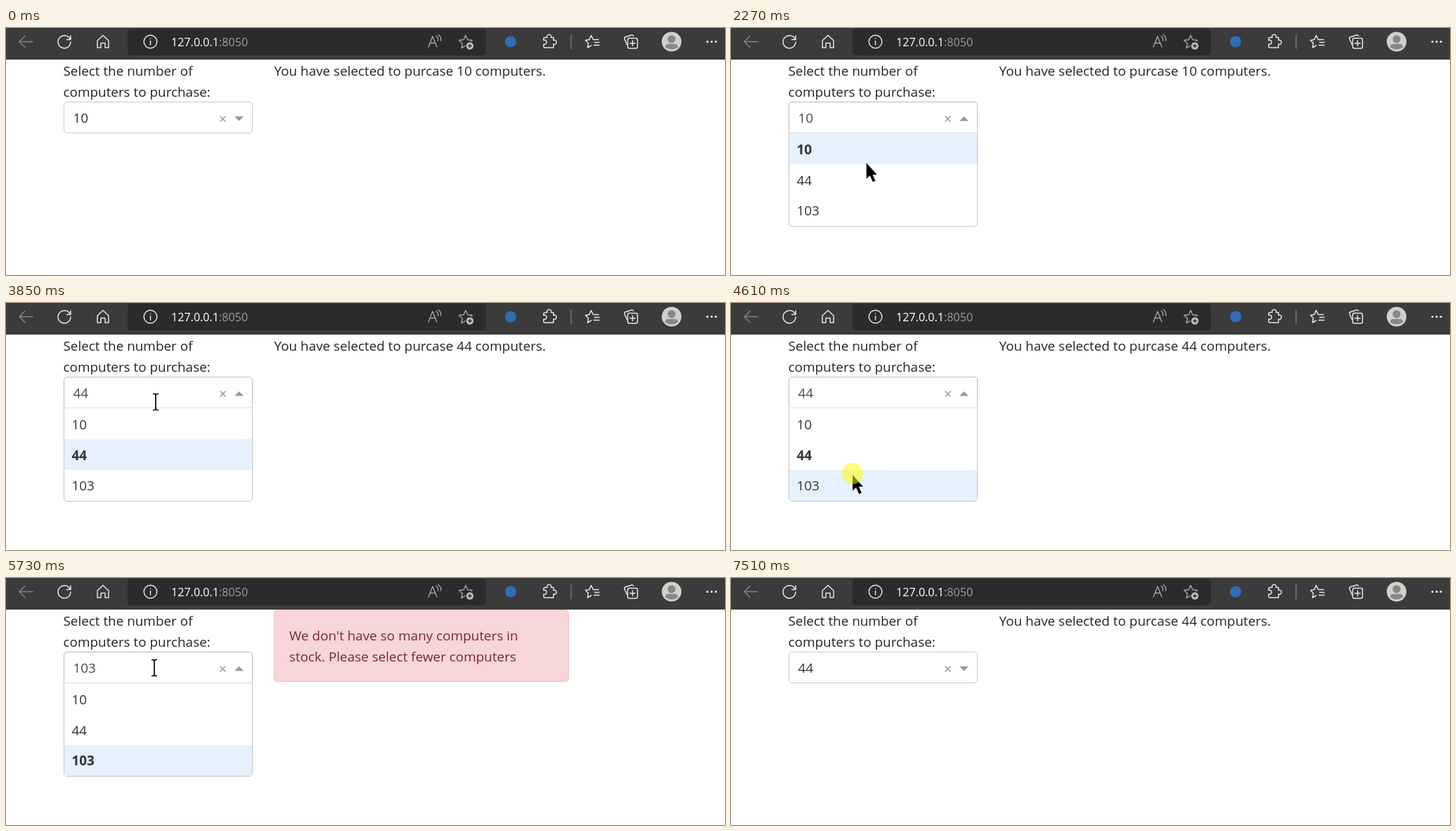
Animation of 1023 by 352 pixels, one loop 7.57 s. Source, as an HTML page:

```html
<!DOCTYPE html>
<html lang="en">
<head>
<meta charset="utf-8">
<title>Computer purchase dropdown</title>
<style>
  html, body { margin: 0; width: 100%; height: 100%; overflow: hidden; background: #fff; }
  svg { display: block; width: 1023px; height: 352px; }
  text { font: 18.9px "Open Sans", "Noto Sans", sans-serif; fill: #212529; white-space: pre; }
  .url { font-size: 16.1px; fill: #9b9b9b; }
  .url tspan { fill: #fff; font-weight: 500; }
  .icon { fill: none; stroke: #e4e4e4; stroke-width: 1.5; stroke-linecap: round; stroke-linejoin: round; }
  .alert text { fill: #7d2631; }
  .option { fill: #333; }
</style>
</head>
<body>
<svg viewBox="0 0 1023 352" xmlns="http://www.w3.org/2000/svg">
  <!-- browser bar -->
  <rect width="1023" height="45" fill="#3b3b3b"/>
  <rect id="reloadHover" x="58" y="1" width="50" height="37.5" rx="4" fill="#4d4d4d"/>
  <rect x="173" y="1" width="510" height="38" rx="5" fill="#2b2b2b"/>
  <g class="icon">
    <path d="M38 19.5H19M27 11.5 19 19.5 27 27.5" stroke="#858585"/>
    <path d="M91.2 16A9 9 0 1 0 92 20M92 11V16.5H86.5"/>
    <path d="M130 18 138 10.5 146 18V28H141V21.5H135V28H130Z"/>
    <circle cx="205.5" cy="19.5" r="9.3"/>
    <path d="M205.5 18.5V24M205.5 15V15.2"/>
    <g stroke="#a5a5a5" stroke-width="1.4">
      <path d="M601 27 607 12 613 27M603.3 21.5H610.7M612 11.5Q615.5 14 614.5 18M615 9.5Q620 13 618.5 18"/>
      <path transform="translate(654 20)" d="M0-9.5 2.8-3.2 9.5-2.5 4.5 2 6 8.7 0 5.2-6 8.7-4.5 2-9.5-2.5-2.8-3.2Z"/>
    </g>
    <path d="M767 13.5H770A3 3 0 1 1 775.5 13.5H779V17.5A3 3 0 1 1 779 23V28H767Q765 28 765 26V23A3 3 0 1 0 765 17.5V15.5Q765 13.500 767 13.500Z"/>
    <path d="M804 10V29.5" stroke="#777"/>
    <path d="M843 16.5H835.5L832.5 10.5 830 16.5 824.5 17.5 828.5 21.5 827.5 28 832.5 25M837.5 20.5H844M836.5 24.5H844"/>
    <path d="M883.5 23.5 880 15.5Q879.5 13.5 881.5 12.8L890 10Q892 9.5 892.7 11.3"/>
    <rect x="884.5" y="14.5" width="14" height="14.5" rx="2.5"/>
    <path d="M891.5 18V25.5M887.8 21.7H895.2"/>
  </g>
  <circle cx="660" cy="25.5" r="6.5" fill="#2b2b2b"/>
  <circle cx="660" cy="25.5" r="5.2" fill="#bcbcbc"/>
  <path d="M660 22.7V28.3M657.2 25.5H662.8" stroke="#2b2b2b" stroke-width="1.3"/>
  <circle cx="718" cy="19.5" r="8" fill="#2f6db8"/>
  <circle cx="947" cy="19.5" r="14" fill="#d2d0ce"/>
  <circle cx="947" cy="15.8" r="5.6" fill="#8a8886"/>
  <path d="M938 27.5Q938 22.8 942 22.8H952Q956 22.8 956 27.5Q952 30.5 947 30.5T938 27.5Z" fill="#8a8886"/>
  <path d="M998 19.5H1011" stroke="#eee" stroke-width="3.2" stroke-linecap="round" stroke-dasharray="0 6"/>
  <text class="url" x="235" y="25.5"><tspan>127.0.0.1</tspan>:8050</text>

  <!-- page -->
  <text id="loading" x="0" y="68">Loading...</text>
  <g id="page">
    <text x="81.5" y="68">Select the number of</text>
    <text x="81.5" y="98">computers to purchase:</text>
    <text id="message" x="381.5" y="68"></text>
    <g id="alert" class="alert">
      <rect x="381.5" y="45.5" width="419" height="102" rx="5" fill="#f6d6d9" stroke="#f1c0c6"/>
      <text x="403" y="89">We don't have so many computers in</text>
      <text x="403" y="119">stock. Please select fewer computers</text>
    </g>
    <rect id="glow" x="80.5" y="103.5" width="272" height="48" rx="6" fill="none" stroke="#007eff" stroke-opacity=".13" stroke-width="4"/>
    <rect id="control" x="82.5" y="105.5" width="268" height="44" rx="4.5" fill="#fff"/>
    <g id="menu">
      <path d="M82.5 144V278Q82.5 282.5 87 282.5H346Q350.5 282.5 350.5 278V144" fill="#fff" stroke="#c4c4c4"/>
      <rect id="highlight" x="83" width="267" height="44" fill="#e5f1fd"/>
      <path d="M83 149.5H350" stroke="#e0e0e0"/>
    </g>
    <text id="value" x="95.5" y="135"></text>
    <path id="clear" d="M304.5 125.5 312.5 133.5M312.5 125.5 304.5 133.5" stroke-width="1.5"/>
    <path id="caret"/>
  </g>

  <g id="cursor">
    <path id="arrow" d="M0 0V22.5L5 18 9.2 27.2 12.8 25.5 8.8 16.8H15Z" stroke="#fff" paint-order="stroke"/>
    <path id="beam" d="M-4-11.5H-1.5L0-10.5 1.5-11.5H4M-4 11.5H-1.5L0 10.5 1.5 11.5H4M0-10.5V10.5" fill="none" stroke="#000" stroke-width="1.7"/>
    <circle id="click" cy="-2" r="15" fill="#ff0" opacity=".52"/>
  </g>
</svg>
<script>
const LOOP = 7570, REFRESH = 68, HOLD = 130;
const RELOADED = 1340, ENTER = 130, LEAVE = 7310, BLUR = 7510;
const OPTIONS = [10, 44, 103], ROW = 44, MENU_TOP = 150;

// Pointer glides from where it rests to each place in turn
const GLIDES = [
  { from: 0, to: ENTER, at: [577, 258] },
  { from: ENTER, to: 270, at: [205, 139] },
  { from: 540, to: 860, at: [84, 25] },
  { from: 1270, to: RELOADED, at: [202, 107] },
  { from: RELOADED, to: 1600, at: [206, 128] },
  { from: 1950, to: 2630, at: [189, 210] },
  { from: 2900, to: 3390, at: [213, 141] },
  { from: 3790, to: 4340, at: [173, 245] },
  { from: 5070, to: 5600, at: [211, 128] },
  { from: 5930, to: 6210, at: [200, 214] },
  { from: 6480, to: 6760, at: [794, 268] },
  { from: 6970, to: LEAVE, at: [958, 348] }
];

// Opening reacts to the press, everything else to the release
const CLICKS = [
  { press: 864, does: "reload" },
  { press: 1620, does: "open" },
  { press: 2770, does: 44 },
  { press: 3520, does: "open" },
  { press: 4610, does: 103 },
  { press: 5600, does: "open" },
  { press: 6350, does: 44 }
];
CLICKS.forEach(c => c.effect = c.does === "open" ? c.press : c.press + HOLD);

const ui = {};
document.querySelectorAll("[id]").forEach(el => ui[el.id] = el);

const set = (el, attrs) => Object.entries(attrs).forEach(([k, v]) => el.setAttribute(k, v));
const show = (el, on) => set(el, { visibility: on ? "inherit" : "hidden" });
const easeOut = k => 1 - (1 - k) ** 3;

const options = OPTIONS.map((value, i) => {
  const el = document.createElementNS("http://www.w3.org/2000/svg", "text");
  set(el, { class: "option", x: 93.5, y: 180 + 43.5 * i });
  el.textContent = value;
  return ui.menu.appendChild(el);
});

function pointer(t) {
  const i = GLIDES.findLastIndex(g => g.from <= t);
  const { from, to, at } = GLIDES[i];
  const start = i ? GLIDES[i - 1].at : at;
  const shown = Math.floor((t - from) / REFRESH) * REFRESH;
  const k = t >= to ? 1 : easeOut(shown / (to - from));
  return at.map((end, axis) => start[axis] + (end - start[axis]) * k);
}

function state(t) {
  const done = CLICKS.filter(c => c.effect <= t);
  const last = done.at(-1)?.does;
  const used = done.some(c => c.does === "open") && t < BLUR;
  return {
    value: done.findLast(c => OPTIONS.includes(c.does))?.does ?? OPTIONS[0],
    open: last === "open",
    used,
    focused: used && last !== "open",
    loading: last === "reload" && t < RELOADED
  };
}

function render(t) {
  const [x, y] = pointer(t);
  const { value, open, used, focused, loading } = state(t);
  const tooMany = value === 103;

  show(ui.reloadHover, pointer(Math.max(0, t - REFRESH))[1] < 45);
  show(ui.page, !loading);
  show(ui.loading, loading);

  show(ui.alert, tooMany);
  show(ui.message, !tooMany);
  ui.message.textContent = `You have selected to purcase ${value} computers.`;

  show(ui.glow, focused);
  set(ui.control, { stroke: focused ? "#147ee8" : open ? "#b8b8b8" : "#c9c9c9" });
  ui.value.textContent = value;
  ui.value.style.fill = focused ? "#25528f" : open ? "#4a4a4a" : "#333";

  const grey = focused ? "#8d9dbd" : "#999";
  set(ui.clear, { stroke: grey });
  set(ui.caret, { d: open ? "M325 132.5H338L331.5 126Z" : "M325 126H338L331.5 132.5Z", fill: grey });

  show(ui.menu, open);
  const row = y > MENU_TOP ? Math.min(2, Math.floor((y - MENU_TOP) / ROW)) : OPTIONS.indexOf(value);
  set(ui.highlight, { y: MENU_TOP + row * ROW });
  options.forEach((el, i) => el.style.fontWeight = OPTIONS[i] === value ? 700 : 400);

  const overField = used && x > 82 && x < 351 && y > 105 && y < MENU_TOP;
  show(ui.cursor, t >= ENTER && t < LEAVE);
  set(ui.cursor, { transform: `translate(${x} ${y})` });
  show(ui.arrow, !overField);
  show(ui.beam, overField);
  show(ui.click, CLICKS.some(c => t >= c.press && t < c.press + HOLD));
}

const start = performance.now();
function tick() {
  render((performance.now() - start) % LOOP);
  requestAnimationFrame(tick);
}
tick();
</script>
</body>
</html>
```
